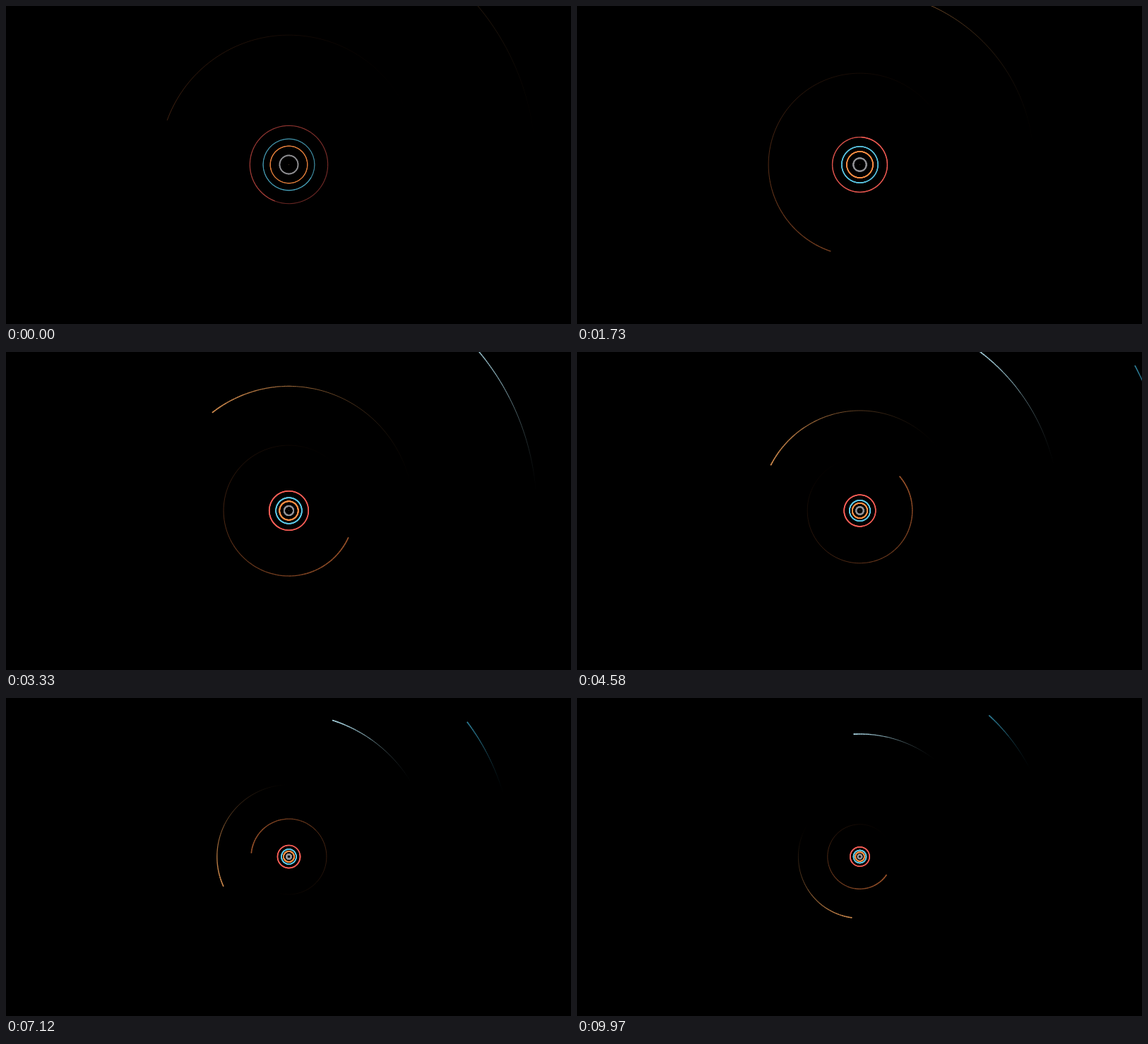
An HTML page with a canvas for the animation above (10 s loop, 800 px wide and 450 px high).

```html
<!DOCTYPE html>
<html lang="en">
<head>
<meta charset="utf-8">
<title>Orbits</title>
<style>
html, body { margin: 0; width: 100%; height: 100%; overflow: hidden; background: #000; }
canvas { display: block; }
</style>
</head>
<body>
<canvas id="sky" width="800" height="450"></canvas>
<script>
const ctx = document.getElementById("sky").getContext("2d");
const LOOP = 10000, FPS = 30;
const CX = 400.5, CY = 224.5;
const TICK = 1 / 60;      // trail sampling, seconds
const TRAIL = 360;        // trail length in ticks
const LEAD = 180;         // ticks already run when the loop starts
const WIDTH = 1.7;        // line width at the head
const RAD = Math.PI / 180;

// size relative to the saturn orbit, angle at time 0, degrees per second,
// line width at the tail
const planets = [
  { size: 0.039,  start: 310,   speed: 2493,  tail: 0.8, color: "#909094" },
  { size: 0.0757, start: 200,   speed: 976,   tail: 0.8, color: "#ff9045" },
  { size: 0.1043, start: 330,   speed: 600,   tail: 0.8, color: "#5cc8e6" },
  { size: 0.158,  start: 249,   speed: 322,   tail: 0.8, color: "#ff6159" },
  { size: 0.525,  start: 160,   speed: 52.77, tail: 0,   color: "#a0552b" },
  { size: 1,      start: 60.4,  speed: 20.3,  tail: 0,   color: "#d89050" },
  { size: 1.992,  start: 21.2,  speed: 7.2,   tail: 0,   color: "#b4e4f2" },
  { size: 3.11,   start: 11.1,  speed: 3.66,  tail: 0,   color: "#2f839e" }
];

// camera distance at a few moments
const zoom = [[0, 28.63], [1.73, 40.55], [3.33, 56.75], [4.58, 70.8],
              [5.58, 82.55], [7.12, 98.5], [9.97, 114.8]];
const drift = t => 11.93 * Math.cos(0.267 * (t - 4.55));

function distance(t) {
  let i = 0;
  while (i < zoom.length - 2 && t > zoom[i + 1][0]) i++;
  const [t0, a] = zoom[i], [t1, b] = zoom[i + 1];
  const h = t1 - t0, s = (t - t0) / h, q = 1 - s;
  return a * q * q * (1 + 2 * s) + b * s * s * (3 - 2 * s)
       + h * s * q * (q * drift(t0) - s * drift(t1));
}

function drawTrail(p, t, unit) {
  const r = p.size * unit;
  const count = Math.min(TRAIL, LEAD + Math.round(t / TICK));
  const step = Math.max(1, Math.ceil(3 / (p.speed * TICK * RAD * r)));
  const head = p.start + p.speed * t;
  const point = age => {
    const a = (head - p.speed * age * TICK) * RAD;
    return [CX + r * Math.cos(a), CY - r * Math.sin(a)];
  };
  ctx.strokeStyle = p.color;
  for (let age = Math.floor((count - 1) / step) * step; age >= 0; age -= step) {
    const k = Math.max(0, count - age - step / 2) / TRAIL;
    if (!k) continue;
    ctx.globalAlpha = k;
    ctx.lineWidth = p.tail + (WIDTH - p.tail) * k;
    ctx.beginPath();
    ctx.moveTo(...point(Math.min(age + step, count)));
    ctx.lineTo(...point(age));
    ctx.stroke();
  }
}

function draw(t) {
  ctx.globalAlpha = 1;
  ctx.fillStyle = "#000";
  ctx.fillRect(0, 0, 800, 450);
  ctx.globalAlpha = 0.45;
  ctx.fillStyle = "#d8a080";
  ctx.beginPath();
  ctx.arc(CX, CY, 0.5, 0, 2 * Math.PI);
  ctx.fill();
  const unit = 10000 / distance(t);
  for (const p of planets) drawTrail(p, t, unit);
}

let shown = -1;
function frame() {
  const ms = performance.now() % LOOP;
  const k = Math.min(LOOP / 1000 * FPS - 1, Math.floor(ms * FPS / 1000 + 0.12));
  if (k !== shown) draw(k / FPS);
  shown = k;
  requestAnimationFrame(frame);
}
frame();
</script>
</body>
</html>
```
